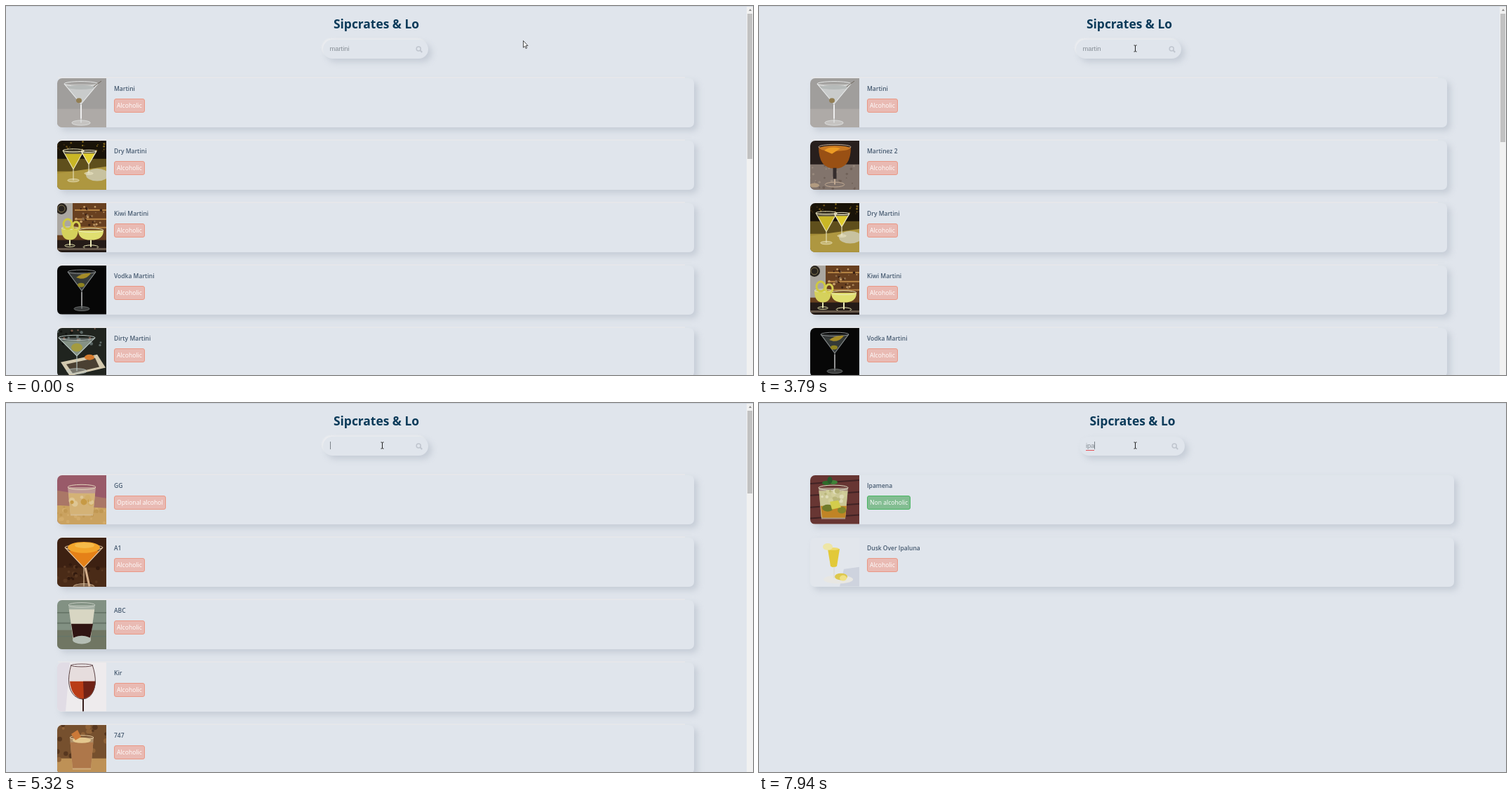
Write an HTML page that moves like this. It is 1065x526 px and loops after 8 s.

```html
<!DOCTYPE html>
<html lang="en">
<head>
<meta charset="utf-8">
<title>Drink search</title>
<style>
html, body { margin: 0; width: 100%; height: 100%; overflow: hidden; background: #e0e5ec; }
#stage { position: relative; width: 1065px; height: 526px; overflow: hidden; border-top: 1px solid #ced4dd; box-sizing: border-box; background: #e0e5ec; font: 8.5px/12px "Open Sans", "Noto Sans", sans-serif; }
#stage * { box-sizing: border-box; }
#page { position: absolute; inset: -1px 9px 0 0; }
.full #page { right: 0; }
h1 { position: absolute; left: 0; right: 0; top: 13px; margin: 0; text-align: center; font-size: 17.4px; line-height: 25px; color: #0b3a59; }
#field { position: absolute; left: calc(50% - 76px); top: 48px; width: 150px; height: 27px; border-radius: 14px; padding: 0 9.5px; font: 9.33px/27px "Liberation Sans", Arial, sans-serif; color: #858d94; white-space: nowrap; box-shadow: 5px 5px 9px rgba(163, 172, 186, .42), -2px -2px 2px rgba(237, 238, 241, .85); background: #e0e5ec; }
#field svg { position: absolute; left: 130.5px; top: 8px; }
#caret { display: inline-block; width: 1px; height: 11px; background: #7d848b; vertical-align: -2px; }
.bad { background: linear-gradient(#e4545a, #e4545a) 0 100% / 100% 1px no-repeat; display: inline-block; line-height: 13px; }
#load { position: absolute; left: 0; right: 0; top: 103px; text-align: center; color: #2f3439; }
#list { position: absolute; left: 73px; right: 75px; top: 103px; }
.full #list { right: 74px; }
.card { position: relative; height: 69.5px; margin-bottom: 19.5px; border-radius: 7px; background: #e0e5ec; box-shadow: 5px 5px 9px rgba(163, 172, 186, .42); }
.card::before { content: ""; position: absolute; left: 1px; right: 13px; top: -2px; height: 2px; background: #e6e7ea; }
.full .card::before { display: none; }
.full #field { box-shadow: 5px 5px 9px rgba(163, 172, 186, .42); }
.card svg { position: absolute; left: 0; top: 0; border-radius: 7px 0 0 7px; }
.card b { position: absolute; left: 81px; top: 9px; font-weight: 600; color: #465a70; white-space: nowrap; }
.tag { position: absolute; left: 81px; top: 29px; height: 20px; padding: 0 3px; border: 1px solid #ea9784; border-radius: 3px; background: #e9bab3; color: #fff; font-size: 8.6px; line-height: 18px; white-space: nowrap; }
.free { border-color: #48b561; background: #83bd92; }
#bar { position: absolute; right: 0; top: -1px; width: 9px; height: 526px; background: #f1f1f1; }
#bar::before { content: ""; position: absolute; left: 2.5px; top: 4px; border: 2px solid transparent; border-top: 0; border-bottom: 3px solid #8b8b8b; }
#thumb { position: absolute; left: 1px; top: 11px; width: 7px; background: #c1c1c1; }
.full #bar { display: none; }
.mouse { position: absolute; left: 0; top: -1px; overflow: visible; }
</style>
</head>
<body>
<div id="stage">
  <div id="page">
    <h1>Sipcrates &amp; Lo</h1>
    <div id="field"><span id="query"></span><i id="caret"></i>
      <svg width="12" height="12" fill="none" stroke="#bfc5ce" stroke-width="1.5"><circle cx="5.2" cy="5" r="3"/><path d="M7.4 7.2l2.8 2.8" stroke-width="1.9"/></svg>
    </div>
    <div id="load">Loading...</div>
    <div id="list"></div>
  </div>
  <div id="bar"><div id="thumb"></div></div>
  <svg id="arrow" class="mouse" width="9" height="13"><path d="M.5.5v9.7l2.2-2 1.5 3.4 1.5-.7-1.5-3.3h2.9z" fill="#fff" stroke="#222" stroke-width=".8"/></svg>
  <svg id="beam" class="mouse" width="5" height="10"><path d="M-2-4.5h1.5l.5.5.5-.5h1.5M0-4v8M-2 4.5h1.5l.5-.5.5.5h1.5" fill="none" stroke="#222"/></svg>
</div>
<script>
const $ = id => document.getElementById(id);

// Drawing helpers for the 70 x 70 thumbnails
const box = (x, y, w, h, c) => `<rect x="${x}" y="${y}" width="${w}" height="${h}" fill="${c}"/>`;
const oval = (x, y, rx, c, ry = rx) => `<ellipse cx="${x}" cy="${y}" rx="${rx}" ry="${ry}" fill="${c}"/>`;
const ring = (x, y, rx, ry, c, w = 1) => `<ellipse cx="${x}" cy="${y}" rx="${rx}" ry="${ry}" fill="none" stroke="${c}" stroke-width="${w}"/>`;
const poly = (d, c) => `<path d="${d}" fill="${c}"/>`;
const line = (d, c, w = 1) => `<path d="${d}" fill="none" stroke="${c}" stroke-width="${w}"/>`;
const room = (wall, table, y) => box(0, 0, 70, 70, wall) + box(0, y, 70, 70, table);

function cone(x, y, r, h, foot, c, edge = '#d5d9da') {
  return poly(`M${x - r} ${y}h${2 * r}L${x} ${y + h}z`, edge + '55') +
    poly(`M${x - r * .82} ${y + h * .18}h${r * 1.64}L${x} ${y + h}z`, c) +
    line(`M${x - r} ${y}L${x} ${y + h}L${x + r} ${y}M${x} ${y + h}V${foot}`, edge, 1.1) +
    ring(x, y, r, r * .14, edge) + oval(x, foot, r * .55, edge + '66', r * .15) + ring(x, foot, r * .55, r * .15, edge, .7);
}
function cup(x, y, top, bottom, h, c, edge = '#dcdcd4', fill = .15) {
  const side = top - (top - bottom) * fill;
  return poly(`M${x - top} ${y}h${2 * top}L${x + bottom} ${y + h}h${-2 * bottom}z`, edge + '88') +
    poly(`M${x - side} ${y + h * fill}h${2 * side}L${x + bottom} ${y + h - 2}h${-2 * bottom}z`, c) +
    ring(x, y, top, top * .18, edge);
}
function coupe(x, y, r, h, foot, c, edge = '#b9b3ad') {
  return poly(`M${x - r} ${y}h${2 * r}q0 ${h} ${-r} ${h}q${-r} 0 ${-r} ${-h}z`, c) +
    ring(x, y, r, r * .16, edge) + line(`M${x} ${y + h}V${foot}`, edge, 2) + ring(x, foot, r * .6, r * .15, edge);
}
function specks(n, x, y, w, h, size, colours, seed = 7) {
  let out = '';
  const rnd = () => (seed = seed * 16807 % 2147483647) / 2147483647;
  for (let i = 0; i < n; i++) {
    out += oval((x + rnd() * w).toFixed(1), (y + rnd() * h).toFixed(1), (size * (.4 + rnd() * .6)).toFixed(1), colours[i % colours.length]);
  }
  return out;
}
const lime = (x, y, r) => oval(x, y, r, '#6f9a2c') + oval(x, y, r * .82, '#bfcb80') + line(`M${x - r * .7} ${y}h${r * 1.4}M${x} ${y - r * .7}v${r * 1.4}`, '#a5bd55', .7);
const mint = (x, y) => oval(x - 5, y, 6, '#2f6a2a', 3) + oval(x + 5, y - 1, 6, '#3f8237', 3) + oval(x, y - 4, 3.5, '#28592a', 5);

const photos = {
  'Martini': () => room('#a09e9c', '#aeaaa7', 44) + cone(34, 8, 24, 29, 64, '#c9cbcb', '#e6e8e8') + oval(34, 13, 19, '#b6bab9', 3) + oval(31, 32, 4, '#927e53', 3.5) + line('M52 12L63 4', '#6d665c') + line('M34 38V58', '#ededed', 2),
  'Dry Martini': () => room('#191308', '#a48c36', 43) + specks(24, 0, 0, 70, 15, 1.6, ['#6f5519', '#362710', '#8f7322'], 11) + box(0, 26, 70, 18, '#5f4f1c') + poly('M0 47L70 37V70H0z', '#ae9740') + oval(57, 49, 16, '#c8c2a0', 9) + cone(23, 14, 15, 27, 57, '#c9b626', '#e9e3bd') + cone(45, 15, 11, 19, 47, '#e0cd2e', '#efe9c9'),
  'Kiwi Martini': () => room('#684020', '#241b17', 53) + [9, 22, 34].map(y => box(25, y, 45, 2, '#b68445')).join('') + specks(30, 27, 3, 43, 30, 2, ['#c49c67', '#3a2114', '#8e6c4a'], 5) + box(0, 0, 22, 46, '#aaa6a0') + oval(6, 8, 8, '#29241f') + ring(6, 8, 5, 5, '#857853') + coupe(18, 36, 12, 17, 61, '#d5d15c', '#e3e2ae') + coupe(48, 39, 18, 14, 63, '#e0df70', '#ebe9b7') + ring(15, 30, 6, 7, '#cfc940', 3) + ring(27, 33, 5, 6, '#d6cf51', 3) + line('M0 66H70', '#66584b', 3),
  'Vodka Martini': () => box(0, 0, 70, 70, '#070707') + cone(35, 9, 20, 27, 62, '#353a39', '#85898a') + poly('M27 17q10-7 21-6q-5 8-15 8z', '#a68c27') + oval(34, 28, 5, '#908420', 3) + line('M35 38V58', '#aaa', 1.5),
  'Dirty Martini': () => box(0, 0, 70, 70, '#20241f') + specks(26, 0, 0, 70, 28, 2.5, ['#5b6765', '#11130f', '#79594a'], 9) + poly('M5 49L57 38L69 57L18 69z', '#d3c9ae') + poly('M13 52L54 43L60 56L22 65z', '#4a4032') + cone(28, 14, 26, 26, 62, '#849184', '#b9c6c3') + oval(28, 28, 8, '#a39b40', 6) + oval(46, 42, 7, '#d47b2f', 4),
  'Martinez 2': () => room('#281f1d', '#82746c', 34) + specks(30, 0, 36, 70, 33, 2, ['#96877b', '#706158'], 4) + oval(6, 64, 7, '#b29b80', 3) + coupe(35, 9, 23, 31, 63, '#995014', '#c1aa93') + oval(35, 11, 21, '#c77722', 4) + poly('M20 14q8-7 23-3l-12 8z', '#ec9b24') + line('M35 39V55', '#342c2c', 5),
  'Adam': () => room('#928f87', '#6f5a3c', 32) + poly('M0 40L70 33V44L0 52z', '#826a48') + poly('M20 45L60 43L69 70H6z', '#dedfdd') + cone(40, 13, 25, 24, 61, '#8a5730', '#bdb7a9') + oval(29, 9, 13, '#68908f', 7) + lime(51, 12, 10),
  'Smut': () => box(0, 0, 70, 70, '#c9ab9c') + specks(90, 0, 0, 70, 70, 1.2, ['#a77c70', '#e0cabf', '#b98d7e'], 8) + poly('M0 0H30L14 32H0z', '#ead8c4') + poly('M52 30L70 22V62L48 64z', '#b7978a') + cup(37, 9, 15, 11, 56, '#dd4129', '#dea28d', .08) + oval(37, 14, 13, '#e9805f', 4) + oval(40, 30, 8, '#ec664a', 10) + poly('M13 10q4 17 24 16q-5 9-17 0q-7-7-7-16z', '#a5a247'),
  'Melya': () => {
    let s = box(0, 0, 70, 70, '#dfe4f0');
    for (let i = -70; i < 70; i += 14) s += line(`M${i} 70L${i + 70} 20`, '#2a50a8cc', 8) + line(`M${i} 20L${i + 50} 75`, '#23479ecc', 7);
    return s + poly('M0 0H70V10L30 6L10 37H0z', '#263124') + poly('M11 26h51l-8 34q-18 7-35 0z', '#b3b1b0') + line('M12 36q24 15 49 0', '#1f1c1d', 7) + oval(36, 24, 27, '#80563b', 18) + oval(36, 22, 25, '#eeeeec', 15.5);
  },
  'Orgasm': () => room('#9a8d80', '#e9e9eb', 44) + poly('M0 0H70V12L0 26z', '#8b7e71') + [40, 50, 60].map(x => line(`M${x} 0V34`, '#7d7166')).join('') + poly('M34 36L70 30V44H30z', '#c9cacd') + poly('M0 52L34 46L70 60V66z', '#c3c6cd') + oval(7, 66, 13, '#dfac64', 6) + cone(24, 16, 22, 27, 62, '#a9825f', '#e2e8ec') + oval(24, 19, 18, '#a2adb6', 4),
  'Mojito': () => room('#7d6750', '#d8cab4', 42) + poly('M0 0H19L10 45H0z', '#5c4b38') + cup(27, 17, 19, 14, 43, '#bab58f', '#eae9dd', .2) + oval(27, 24, 16, '#deddd0', 8) + mint(39, 12) + specks(12, 15, 39, 24, 17, 3, ['#83883c', '#d4d3b6', '#a77e38'], 6) + oval(58, 48, 8, '#5f9a34') + oval(49, 61, 9, '#4e8829') + oval(56, 46, 3, '#a3cf71'),
  'GG': () => room('#995a69', '#caa260', 43) + poly('M0 22L70 33V47L0 43z', '#aa7767') + specks(24, 0, 45, 70, 24, 3, ['#c19853', '#d3ac6b'], 3) + cup(35, 17, 20, 16, 41, '#d4b276', '#e2d3ba', .22) + specks(10, 21, 25, 28, 16, 5, ['#dec694', '#d2ae69', '#c79a45'], 13),
  'A1': () => room('#3d2112', '#4a2b17', 43) + specks(26, 0, 36, 70, 33, 3, ['#583720', '#321a0e'], 5) + cone(38, 14, 27, 29, 70, '#e58118', '#e2c6a3') + oval(38, 14, 23, '#f3a52b', 8) + oval(39, 11, 14, '#f6bb4a', 4) + line('M40 43L46 70', '#d6b18d', 3),
  'ABC': () => room('#829183', '#707663', 43) + line('M0 18H70M0 33H70M0 52H70', '#677568', 2) + cup(35, 7, 19, 12, 53, '#d8d6c3', '#c4cac0', .12) + poly('M20 34h31l-4 20H23z', '#301513') + oval(35, 57, 13, '#b5beb5', 6),
  'Kir': () => box(0, 0, 70, 70, '#eeebed') + poly('M0 0H18L12 70H0z', '#e1dce5') + poly('M20 4Q11 35 25 48Q36 57 47 48Q60 33 50 4z', '#e6dddd') + poly('M18 27H55Q53 50 36 53Q20 49 18 27z', '#b93c16') + poly('M37 27H55Q53 47 38 52z', '#702216') + line('M20 3Q11 35 25 48Q36 57 47 48Q60 33 50 3', '#5a4143') + line('M37 52V70', '#371e1c', 2) + ring(35, 4, 15, 2, '#6b5154'),
  '747': () => room('#76502e', '#be9156', 48) + specks(18, 0, 0, 70, 50, 4, ['#57371f', '#906338'], 21) + cup(35, 18, 17, 13, 46, '#ae774a', '#dfc69c', .15) + oval(35, 22, 13, '#e4c78e', 4) + poly('M20 13l9-6 5 10-8 5z', '#cb7938'),
  'Ipamena': () => box(0, 0, 70, 70, '#683633') + [12, 29, 46, 62].map(y => line(`M0 ${y}L70 ${y - 5}`, '#402324', 2)).join('') + cup(33, 18, 21, 17, 45, '#cbc795', '#dedfc6', .1) + specks(18, 17, 22, 32, 15, 4, ['#dfdcb8', '#d2ce9a', '#b9b67a'], 12) + poly('M15 44h37l-2 17H17z', '#c08425') + oval(25, 47, 8, '#6f7a2a', 5) + oval(45, 50, 6, '#82862c', 5) + poly('M28 38l12-2 4 10-13 3z', '#d3cd4c') + mint(28, 11),
  'Tipperary': () => room('#3b291c', '#694b2d', 56) + specks(28, 0, 0, 70, 50, 2.4, ['#5c4226', '#191411', '#6d4a2d'], 10) + box(2, 14, 11, 42, '#1c1612') + box(60, 10, 10, 46, '#251b14') + poly('M43 0h10v13l5 9v37H37V22l6-9z', '#18251c') + box(37, 27, 21, 23, '#397b39') + line('M39 37H56', '#a9ba65', 2) + coupe(26, 4, 13, 24, 62, '#8a3a28', '#c28b6a') + oval(26, 6, 11, '#af5a3c', 2),
  'Caipirinha': () => room('#b7a17c', '#252a26', 47) + oval(35, 52, 37, '#30352f', 25) + cup(36, 14, 17, 14, 36, '#b5bdac', '#dfe2da', .2) + specks(12, 24, 23, 24, 22, 4, ['#cfd5ca', '#a0aa98', '#adb67c'], 9) + lime(33, 21, 7) + lime(50, 10, 9) + oval(16, 46, 10, '#8dbb3a') + oval(40, 57, 11, '#78af31') + oval(13, 43, 4, '#b9d866'),
  'Zipperhead': () => room('#b4bec7', '#c8bcae', 45) + [5, 24, 45, 62].map(x => box(x, 0, 9, 40, '#d2d8dd')).join('') + line('M0 56H70M0 65H70', '#b0a394') + cup(36, 8, 18, 11, 57, '#e6dde5', '#e8edf0', .1) + specks(14, 24, 16, 24, 22, 4, ['#efe9ee', '#dccfd9'], 17) + poly('M23 48h26l-1 7H24z', '#e5a0b0') + poly('M24 55h24l-2 9H26z', '#d8344c') + line('M16 10q14-3 28 2', '#2a55ac', 6),
  'Porto flip': () => room('#eeedee', '#d5cfd0', 54) + poly('M0 57L70 51V70H0z', '#dec9c6') + cone(35, 14, 34, 32, 70, '#6f3129', '#b7a5a2') + oval(35, 17, 29, '#62271f', 5) + oval(35, 16, 21, '#8f5040', 2),
  'Dusk Over Ipaluna': () => box(0, 0, 70, 70, '#e2e6ec') + poly('M48 45L70 42V70H42z', '#ced3de') + oval(40, 60, 21, '#e8e7e3', 6) + poly('M25 16h17l-4 25q-5 3-9 0z', '#e2c939') + oval(33, 16, 8, '#eedb70', 2) + line('M34 42V58', '#dfdfdb', 2) + oval(25, 13, 7, '#eee6a6', 5) + oval(44, 56, 9, '#ddc84e', 5) + oval(47, 58, 5, '#f0e185', 4),
  'Margarita': () => room('#787c72', '#ad9a7b', 47) + cone(35, 13, 25, 25, 62, '#c4cc84') + lime(51, 14, 9),
  'Acid': () => room('#3c3027', '#7a5f45', 47) + cup(35, 15, 18, 13, 46, '#c58a31'),
  'Bijou': () => room('#302d2a', '#6a5a46', 49) + coupe(35, 13, 21, 24, 61, '#a4602a'),
  'Gimlet': () => room('#a2a89c', '#d0ccc0', 48) + cone(35, 13, 23, 26, 62, '#cdd8a6') + lime(51, 13, 8)
};

const lists = {
  martini: ['Martini', 'Dry Martini', 'Kiwi Martini', 'Vodka Martini', 'Dirty Martini'],
  martin: ['Martini', 'Martinez 2', 'Dry Martini', 'Kiwi Martini', 'Vodka Martini'],
  mar: ['Martini', 'Margarita', 'Martinez 2', 'Dry Martini', 'Kiwi Martini'],
  m: ['Adam', 'Smut', 'Melya', 'Orgasm', 'Mojito'],
  all: ['GG', 'A1', 'ABC', 'Kir', '747'],
  i: ['Kir', 'Acid', 'Bijou', 'Mojito', 'Gimlet'],
  ip: ['Ipamena', 'Tipperary', 'Caipirinha', 'Zipperhead', 'Porto flip'],
  ipa: ['Ipamena', 'Dusk Over Ipaluna']
};
const thumbEnd = { martini: 218, martin: 194, mar: 165, m: 131, all: 129, i: 130, ip: 159 };
const kinds = { 'Melya': 'Non alcoholic', 'Ipamena': 'Non alcoholic', 'GG': 'Optional alcohol' };

// time, query, list, caret, extra
const steps = [
  [0, 'martini', 'martini', 0], [2210, 'martini', 'martini', 1], [2770, 'martini', 'martini', 0], [3200, 'martini', 'martini', 1],
  [3510, 'martin', 'martin', 1], [3790, 'martin', 'martin', 0], [3940, 'ma', 'mar', 0], [4090, '', 'm', 0],
  [4210, '', 'all', 0], [4360, '', 'all', 1], [4760, '', 'all', 0], [5320, '', 'all', 1], [5910, '', 'all', 0],
  [6030, 'i', 'all', 1, 'loading'], [6150, 'i', 'i', 1], [6520, 'ip', 'ip', 1],
  [6920, 'ipa', 'ipa', 1], [7510, 'ipa', 'ipa', 0], [7940, 'ipa', 'ipa', 1, 'misspelt']
];
// time, x, y, text cursor
const moves = [
  [0, 737, 49, 0], [120, 737, 48, 0], [680, 739, 48, 0], [830, 672, 48, 0], [950, 588, 48, 0], [1100, 545, 57, 1],
  [1220, 524.5, 60.5, 1], [1370, 524.5, 61.5, 1], [2210, 525.5, 61.5, 1], [2490, 536.5, 60.5, 1]
];

const card = name => {
  const kind = kinds[name] || 'Alcoholic';
  return `<div class="card"><svg width="70" height="69.5" viewBox="0 0 70 70" preserveAspectRatio="none">${photos[name]()}</svg>` +
    `<b>${name}</b><span class="tag${kind[0] === 'N' ? ' free' : ''}">${kind}</span></div>`;
};
const cards = {};
for (const key in lists) cards[key] = lists[key].map(card).join('');

const at = (table, t) => table.findLast(row => row[0] <= t);
let shown, shownList;

function draw(now) {
  const t = now % 8000;
  const step = at(steps, t);
  if (step !== shown) {
    const [, query, list, caret, extra] = shown = step;
    $('stage').className = list === 'ipa' ? 'full' : '';
    $('query').textContent = query;
    $('query').className = extra === 'misspelt' ? 'bad' : '';
    $('caret').style.opacity = caret;
    $('load').hidden = extra !== 'loading';
    $('list').style.top = extra === 'loading' ? '134px' : '103px';
    $('thumb').style.height = (thumbEnd[list] || 11) - 11 + 'px';
    if (list !== shownList) $('list').innerHTML = cards[shownList = list];
  }
  const [, x, y, text] = at(moves, t);
  const mouse = $(text ? 'beam' : 'arrow');
  $('arrow').style.display = $('beam').style.display = 'none';
  mouse.style.display = 'block';
  mouse.style.transform = `translate(${x}px, ${y}px)`;
}

const start = performance.now();
function tick() {
  draw(Math.max(0, performance.now() - start));
  requestAnimationFrame(tick);
}
tick();
</script>
</body>
</html>
```
